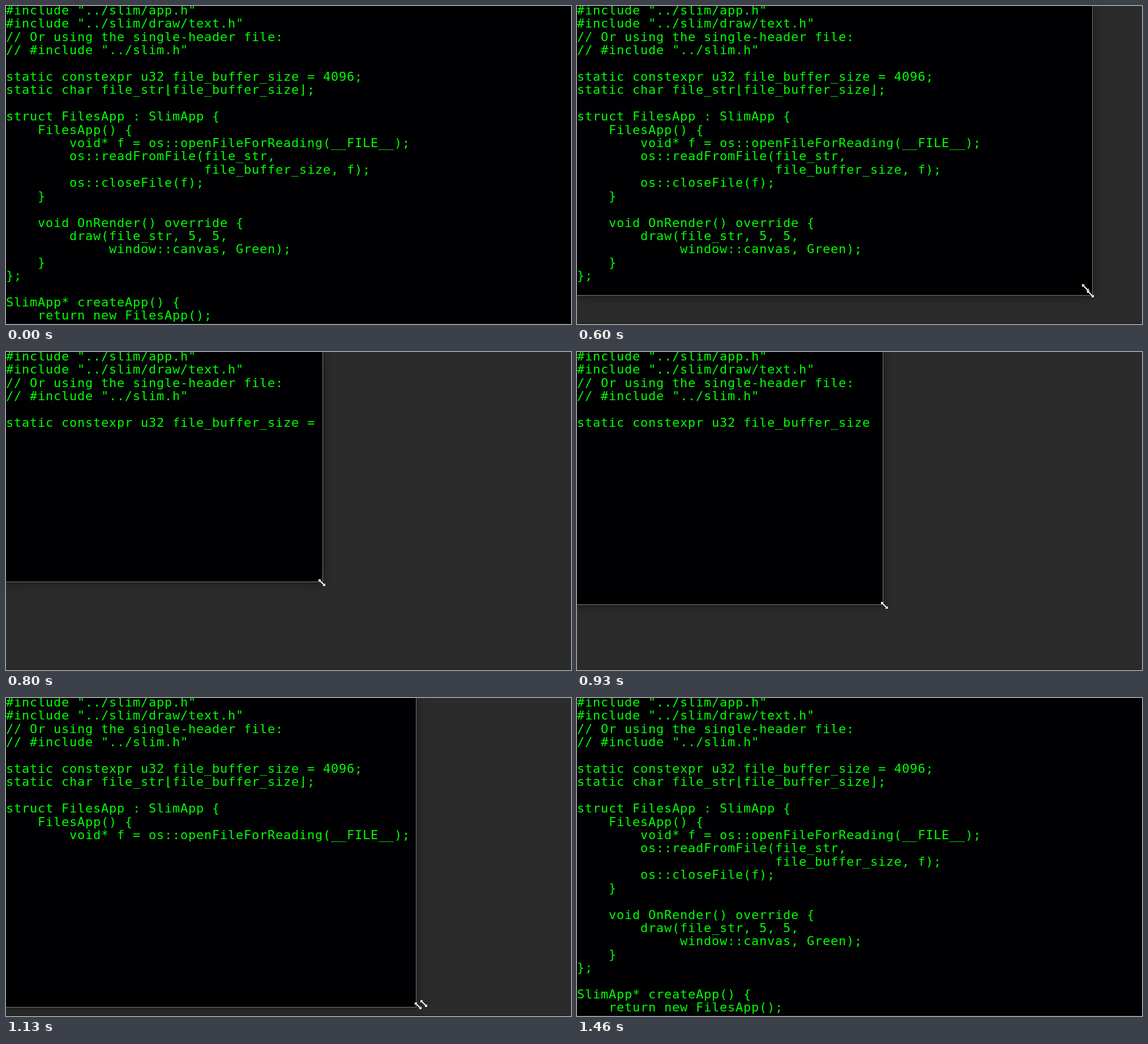
An HTML page that plays this animation: 998x561 px, repeating every 1930 ms.

```html
<!DOCTYPE html>
<html lang="en">
<head>
<meta charset="utf-8">
<title>Resizing a code window</title>
<style>
html, body { margin: 0; width: 100%; height: 100%; overflow: hidden; background: #2b2b2b; }
#stage { position: relative; width: 998px; height: 561px; overflow: hidden; background: #2b2b2b; }
#stage::after { content: ""; position: absolute; left: 0; bottom: 0; width: 100%; height: 1px; background: #181818; }
#window {
  position: absolute; left: -2px; top: -2px; overflow: hidden; background: #010103;
  border: 1px solid #777; box-shadow: 0 2px 16px rgba(0, 0, 0, .4);
}
#code {
  position: absolute; left: 1px; top: -3px; margin: 0; color: #0f0;
  font: 22px/23.4px "DejaVu Sans Mono", monospace; font-variant-ligatures: none;
}
svg { position: absolute; left: 0; top: 0; overflow: visible; }
</style>
</head>
<body>
<div id="stage">
  <div id="window"><pre id="code"></pre></div>
  <svg width="998" height="561">
    <defs>
      <path id="arrow" d="M-6-6h5l-1.8 1.8 7 7 1.8-1.8v5h-5l1.8-1.8-7-7-1.8 1.8z"
        fill="#fff" stroke="#111" stroke-width="1" paint-order="stroke"/>
    </defs>
    <use class="cursor" href="#arrow"/>
    <use class="cursor" href="#arrow"/>
  </svg>
</div>
<script>
const LOOP = 1930, CELL = 14;
const source = `#include "../slim/app.h"
#include "../slim/draw/text.h"
// Or using the single-header file:
// #include "../slim.h"

static constexpr u32 file_buffer_size = 4096;
static char file_str⌊file_buffer_size⌋;

struct FilesApp : SlimApp {
    FilesApp() {
        void* f = os::openFileForReading(__FILE__);
        os::readFromFile(file_str,
                         file_buffer_size, f);
        os::closeFile(f);
    }

    void OnRender() override {
        draw(file_str, 5, 5,
             window::canvas, Green);
    }
};

SlimApp* createApp() {
    return new FilesApp();
}`;

// start time, right edge, bottom edge, cursor positions
const steps = [
  [0, 1040, 620],
  [460, 974, 585],
  [530, 955, 550, [954, 551]],
  [600, 910, 510, [898, 497], [907, 508]],
  [660, 810, 478, [809, 480]],
  [730, 680, 440, [679, 442]],
  [800, 559, 405, [558, 407]],
  [860, 520, 405, [520, 407]],
  [930, 540, 445, [543, 447]],
  [1000, 592, 494, [599, 495], [656, 501]],
  [1060, 655, 508, [658, 508]],
  [1130, 724, 545, [728, 543], [738, 539]],
  [1200, 795, 558, [800, 556]],
  [1260, 865, 575],
  [1330, 930, 590],
  [1400, 980, 605],
  [1460, 1040, 620]
];

const frame = document.getElementById("window");
const code = document.getElementById("code");
const cursors = document.querySelectorAll(".cursor");

// Drawing stops at the first character, newlines included, that overflows.
function fitText(width) {
  let column = 0;
  for (let i = 0; i < source.length; i++) {
    if (++column * CELL > width) return source.slice(0, i);
    if (source[i] === "\n") column = 0;
  }
  return source;
}

function setCellWidth() {
  const sample = 100;
  code.textContent = "0".repeat(sample);
  const advance = code.getBoundingClientRect().width / sample;
  code.style.letterSpacing = CELL - advance + "px";
}

function show([, right, bottom, ...points]) {
  frame.style.width = right + 1 + "px";
  frame.style.height = bottom + 1 + "px";
  code.textContent = fitText(right);
  cursors.forEach((cursor, i) => {
    const point = points[i];
    cursor.style.display = point ? "" : "none";
    if (point) cursor.setAttribute("transform", `translate(${point})`);
  });
}

let current;
const start = performance.now();
function tick() {
  const time = (performance.now() - start) % LOOP;
  const step = steps.findLast(([at]) => at <= time);
  if (step !== current) show(current = step);
  requestAnimationFrame(tick);
}

setCellWidth();
tick();
</script>
</body>
</html>
```
